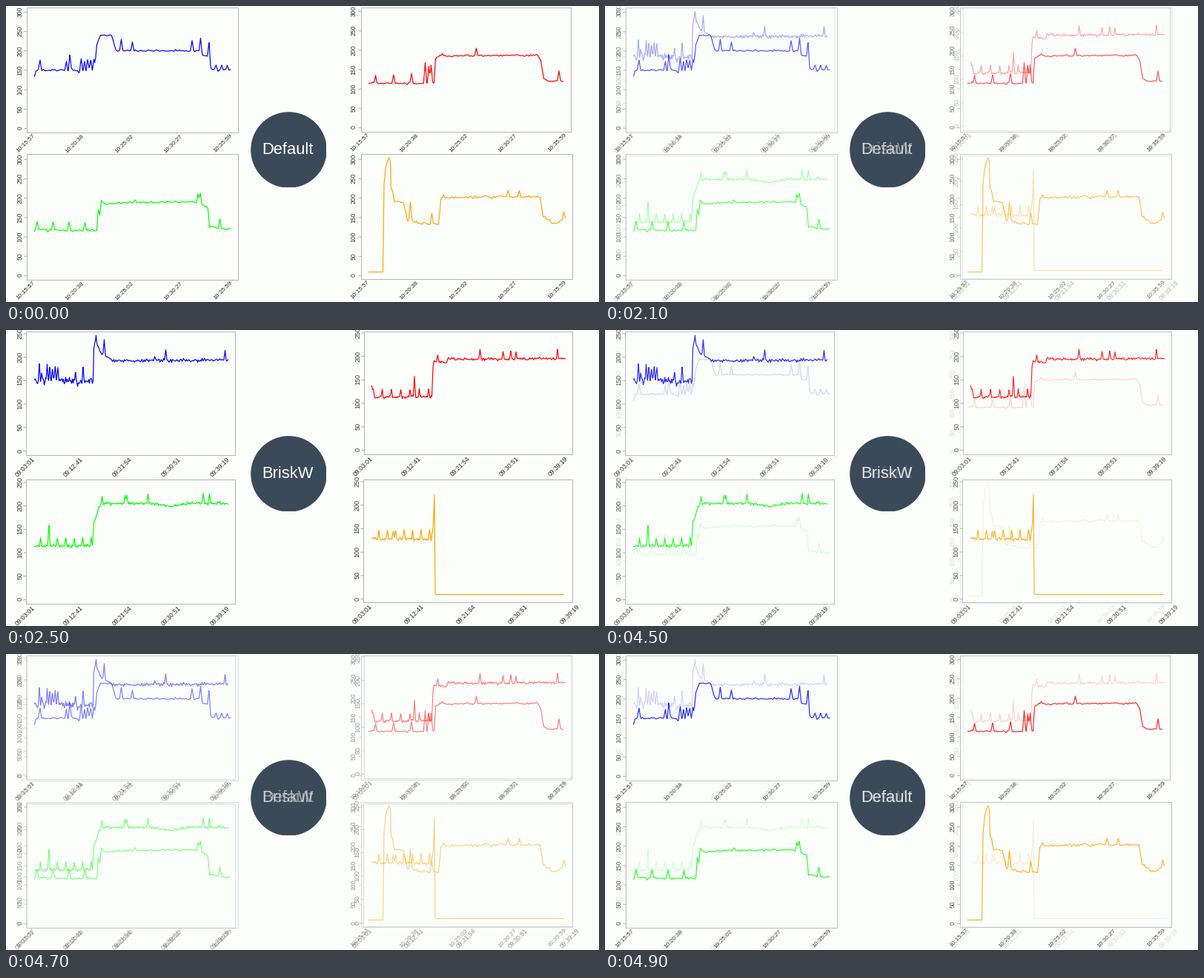
A matplotlib script that plays this animation: 800 by 400 pixels, repeating every 5 s.

```python
import numpy as np
import matplotlib.pyplot as plt
from matplotlib.animation import FuncAnimation
from matplotlib.patches import Circle, Rectangle

W, H, DPI = 800, 400, 100
PX = 72 / DPI
FRAMES, STEP = 50, 100
BLUE, RED, GREEN, ORANGE = "#0000ff", "#ff0000", "#00ff00", "#ffa500"

plt.rcParams["font.family"] = "Liberation Sans"
fig = plt.figure(figsize=(W / DPI, H / DPI), dpi=DPI, facecolor="#fcfefc")
ax = fig.add_axes([0, 0, 1, 1])
ax.set_xlim(0, W)
ax.set_ylim(H, 0)
ax.axis("off")


def comb(start, gap, count, height):
    """Evenly spaced spikes of one height."""
    return [(start + k * gap, height) for k in range(count)]


def curve(path, spikes, seed, noise, grain, width, floor):
    """Load curve: key levels, spikes and jitter that is absent at idle."""
    px, py = zip(*path)
    x = np.arange(px[0], px[-1] + .1, .5)
    y = np.interp(x, px, py)
    early, late, split = noise
    coarse = np.arange(px[0], px[-1] + grain, grain)
    jitter = np.random.default_rng(seed).normal(0, 1, coarse.size)
    amp = np.where(x < split, early, late) * (y < floor - 10)
    lift = sum(h * np.clip(1 - abs(x - c) / width, 0, 1) for c, h in spikes)
    return x + .5, y + .5 + amp * np.interp(x, coarse, jitter) - lift


def panel(box, color, path, spikes, seed, noise, zero, ylab, right, gap, style):
    """Draw one chart and return its artists; box is left, top, right, bottom."""
    x0, y0, x1, y1 = box
    size = style["size"]
    out = [ax.add_patch(Rectangle((x0 + .5, y0 + .5), x1 - x0, y1 - y0, fill=False,
                                  ec="#b4b4b8", lw=PX, snap=False))]
    for k in range(style["top"] // 50 + 1):
        y = zero - k * style["unit"]
        out += ax.plot([x0 - 3, x0], [y + .5] * 2, color="#a8a8a8", lw=PX, snap=False)
        out.append(ax.text(ylab + 1, y, str(50 * k), rotation=90, ha="center",
                           va="center", size=size * 1.04 * PX, color="#333333"))
    for k, label in enumerate(style["times"]):
        out.append(ax.text(right + 1.5 + k * gap, y1 + 1, label, rotation=45,
                           ha="right", va="top", size=size * PX, color="#2a2a2a"))
    x, y = curve(path, spikes, seed, noise, style["grain"], style["width"], zero)
    out += ax.plot(x, y, color=color, lw=1.2 * PX, solid_joinstyle="round")
    return out


def caption(label):
    return [ax.text(380, 192.5, label, ha="center", va="center_baseline",
                    size=22 * PX, color="white", zorder=6)]


def scene_a():
    style = dict(unit=26.2, top=300, size=8.3, grain=2, width=2.2,
                 times=["10:15:57", "10:20:38", "10:25:02", "10:30:27", "10:35:59"])
    blue = panel(
        (28, 2, 313, 171), BLUE,
        [(38, 94), (40, 86), (119, 87), (122, 52), (127, 39), (142, 39), (148, 60),
         (262, 60), (265, 66), (273, 68), (275, 82), (280, 86), (302, 86)],
        comb(101, 4.3, 5, 15) + comb(283, 7.5, 3, 6)
        + [(45.5, 14), (81, 13), (85.5, 18), (155, 15), (170, 12), (250.5, 13),
           (262, 17), (273.5, 22)],
        1, (1.5, .7, 122), zero=165, ylab=18, right=39, gap=66.5, style=style)
    red = panel(
        (479, 2, 762, 170), RED,
        [(489, 104), (577, 104), (579, 70), (584, 67), (717, 66), (721, 74),
         (725, 97), (730, 101), (751, 101)],
        comb(498, 24.3, 3, 12)
        + [(565, 27), (570, 24), (573, 24), (588, 4), (634, 10), (745.5, 13)],
        2, (.8, .6, 580), zero=164, ylab=468, right=490, gap=66.5, style=style)
    green = panel(
        (28, 200, 313, 370), GREEN,
        [(38, 302), (122, 303), (124, 275), (126, 282), (128, 262), (134, 267),
         (171, 265), (261, 264), (264, 268), (272, 273), (274, 298), (302, 301)],
        comb(41.5, 21.5, 4, 11) + [(173, 3), (258.5, 11), (261.5, 11), (288, 12)],
        3, (.8, .7, 130), zero=364, ylab=18, right=39, gap=66.5, style=style)
    orange = panel(
        (479, 200, 764, 369), ORANGE,
        [(489, 359), (508, 359), (509.5, 240), (512, 215), (516, 205), (518, 210),
         (519, 243), (524, 264), (536, 265), (541, 290), (560, 293), (583, 295),
         (586, 260), (604, 258), (720, 257), (724, 284), (740, 293), (754, 286)],
        [(545, 27), (574, 14), (590, 5), (677, 10), (692, 9), (752, 10)],
        4, (1.2, 1, 590), zero=364, ylab=468, right=490, gap=66.5, style=style)
    return blue + red + green + orange + caption("Default")


def scene_b():
    style = dict(unit=31.7, top=250, size=8.7, grain=1, width=1.6,
                 times=["09:03:01", "09:12:41", "09:21:54", "09:30:51", "09:39:19"])
    blue = panel(
        (27, 2, 309, 169), BLUE,
        [(38, 69), (117, 69), (118, 26), (121, 8), (122, 18), (127, 30), (137, 37),
         (145, 41), (299, 40)],
        comb(55, 3.6, 5, 20)
        + [(44.5, 22), (47.5, 14), (93.5, 13), (103.5, 19), (132, 19), (200, 6),
           (215, 15), (295, 14)],
        5, (2.8, 1.1, 118), zero=163, ylab=18, right=39, gap=65.7, style=style)
    red = panel(
        (483, 2, 764, 168), RED,
        [(493, 74), (497, 90), (574, 90), (575.5, 50), (577, 42), (583, 42),
         (592, 44), (600, 39), (754, 38)],
        comb(507, 12.5, 6, 10)
        + [(550.5, 28), (582, 9), (596, 6), (639, 13), (670, 10), (680.5, 12),
           (687.5, 10), (743.5, 11)],
        6, (1.1, .9, 576), zero=162, ylab=474, right=495, gap=65.8, style=style)
    green = panel(
        (27, 202, 309, 370), GREEN,
        [(38, 292), (116, 291), (118, 260), (122, 249), (125, 238), (132, 234),
         (195, 234), (222, 238), (240, 234), (299, 234)],
        comb(46, 11.4, 7, 11)
        + [(57.4, 17), (129, 12), (160, 11), (162.5, 11), (191, 13), (265.5, 13),
           (274, 14)],
        7, (1.2, 1, 118), zero=364, ylab=18, right=39, gap=65.7, style=style)
    orange = panel(
        (482, 202, 764, 368), ORANGE,
        [(493, 282), (573, 282), (576, 263), (577.5, 221), (578.5, 357), (752, 357)],
        comb(502.5, 11.4, 7, 13) + [(522, 12)],
        8, (1, 1, 576), zero=363, ylab=473, right=494, gap=70, style=style)
    return blue + red + green + orange + caption("BriskW")


disc = ax.add_patch(Circle((381.5, 194.5), 51.3, fc="#3b4a58", ec="none", zorder=5))
disc.set_clip_path(Rectangle((330, 143), 102, 102, transform=ax.transData))
first, second = scene_a(), scene_b()


def mix(i):
    """Share of the second scene at step i."""
    if i < 45:
        return min(max((i - 19) / 6, 0), 1)
    return 1 - (i - 44) / 6


def update(i):
    share = mix(i)
    for group, alpha in ((first, 1 - share), (second, share)):
        for art in group:
            art.set_alpha(alpha)
            art.set_visible(alpha > 0)
    return first + second


anim = FuncAnimation(fig, update, frames=FRAMES, interval=STEP,
                     init_func=lambda: update(0), repeat=True, repeat_delay=0)
plt.show()
```
